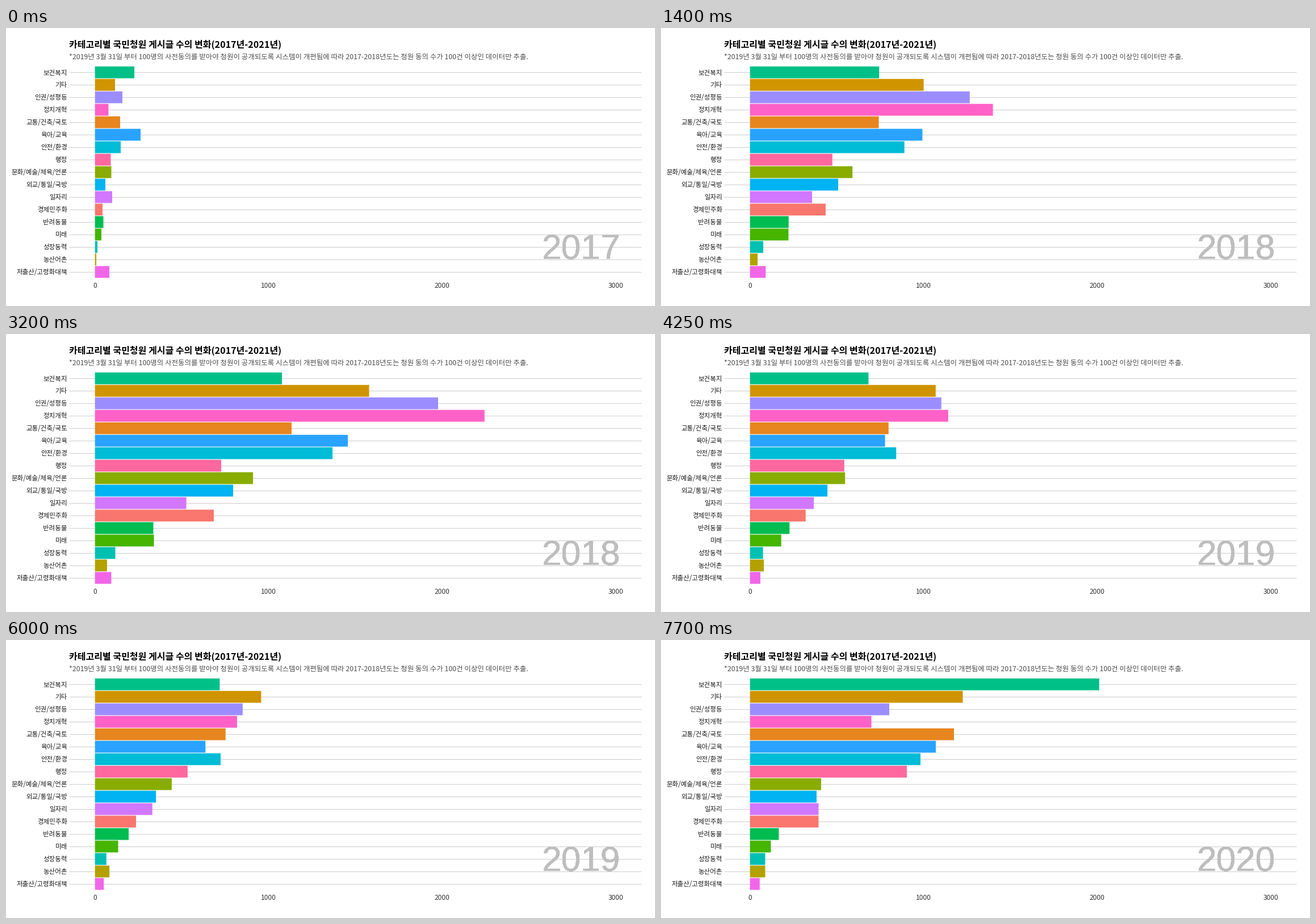
Recreate the animation shown at these times as a matplotlib script. Size 1143x490 px, loop 8000 ms.

```python
import matplotlib.pyplot as plt
from matplotlib.animation import FuncAnimation

WIDTH, HEIGHT, DPI = 1143, 490, 100
INTERVAL, FRAMES = 50, 160
LAST_MOVE = 154
ZERO_X, THOUSAND = 156.7, 305.8
TOP_Y, PITCH, BAR_HEIGHT = 78.2, 21.985, 20.85
YEAR_LAYERS = 8
KOREAN = "Noto Sans CJK JP"

# label, colour, right edge of the bar in 2017, 2018, 2019 and 2020
BARS = [
    ("보건복지", "#00C087", (226, 492.6, 331.5, 771.8)),
    ("기타", "#D09400", (192, 648, 440, 531.5)),
    ("인권/성평등", "#9C8DFF", (205, 775.7, 418.5, 402)),
    ("정치개혁", "#FF61C7", (180.5, 861.3, 411, 370.5)),
    ("교통/건축/국토", "#E7851E", (201, 508.6, 372, 516)),
    ("육아/교육", "#29A3FF", (237, 613.4, 336.2, 484)),
    ("안전/환경", "#00BCD6", (202, 583.9, 369, 457)),
    ("행정", "#FF689E", (184.5, 382.1, 307, 433)),
    ("문화/예술/체육/언론", "#89AC00", (185.5, 441.1, 293, 282)),
    ("외교/통일/국방", "#00B3F2", (175, 405.9, 263, 274)),
    ("일자리", "#D277FF", (187, 320.2, 255.5, 277.5)),
    ("경제민주화", "#F8766D", (170, 372.1, 223.5, 277.5)),
    ("반려동물", "#00BC51", (171.5, 261.3, 217, 207.5)),
    ("미래", "#45B500", (168, 263.2, 198, 193.5)),
    ("성장동력", "#00C0B2", (161, 193.2, 176, 183.5)),
    ("농산어촌", "#B2A100", (159, 177.8, 182, 183.5)),
    ("저출산/고령화대책", "#F166E8", (182, 186, 172, 173.8)),
]

# first frame and length of each move between years
MOVES = [(0, 52.5), (52.8, 51.5), (105, 51)]


def cubic_in_out(p):
    return 4 * p**3 if p < 0.5 else 1 - 4 * (1 - p) ** 3


def timeline(frame):
    """Return the index of the current move and its linear progress."""
    frame = min(frame, LAST_MOVE)
    move = max(i for i, (start, _) in enumerate(MOVES) if frame >= start)
    start, length = MOVES[move]
    return move, min((frame - start) / length, 1)


fig = plt.figure(figsize=(WIDTH / DPI, HEIGHT / DPI), dpi=DPI, facecolor="white")
ax = fig.add_axes([0, 0, 1, 1])
ax.axis("off")


def label(x, y, text, size, color, font=KOREAN, **style):
    return ax.text(x, y, text, fontsize=size * 72 / DPI, color=color,
                   family=font, va="baseline", **style)


label(111, 34.5, "카테고리별 국민청원 게시글 수의 변화(2017년-2021년)", 16.05, "black",
      weight="bold")
label(111, 55.5, "*2019년 3월 31일 부터 100명의 사전동의를 받아야 청원이 공개되도록 "
      "시스템이 개편됨에 따라 2017-2018년도는 청원 동의 수가 100건 이상인 "
      "데이터만 추출.", 12.45, "#4D4D4D")

for i in range(4):
    label(ZERO_X + i * THOUSAND, 458, str(i * 1000), 11.9, "#333333", ha="center")

rows = [TOP_Y + i * PITCH for i in range(len(BARS))]
for y, (name, _, _) in zip(rows, BARS):
    ax.plot([111, 1119], [y, y], color="#CCCCCC", lw=72 / DPI, zorder=1,
            solid_capstyle="butt")
    label(108, y + 4.3, name, 11.5, "#1A1A1A", ha="right")

bars = ax.barh(rows, [0] * len(BARS), BAR_HEIGHT, left=ZERO_X, snap=False,
               color=[color for _, color, _ in BARS], linewidth=0, zorder=2)
ax.set_xlim(0, WIDTH)
ax.set_ylim(HEIGHT, 0)

# stacked copies harden the edges of the digits
years = [label(1012.8, 407, "2017", 62.3, "#BEBEBE", "Liberation Sans", ha="center")
         for _ in range(YEAR_LAYERS)]


def update(frame):
    move, progress = timeline(frame)
    eased = cubic_in_out(progress)
    for bar, (_, _, edges) in zip(bars, BARS):
        start, end = edges[move:move + 2]
        bar.set_width(start + (end - start) * eased - ZERO_X)
    for year in years:
        year.set_text(str(2017 + move + (progress >= 0.5)))
    return [*bars, *years]


animation = FuncAnimation(fig, update, frames=FRAMES, interval=INTERVAL,
                          repeat=True, repeat_delay=0)
plt.show()
```
